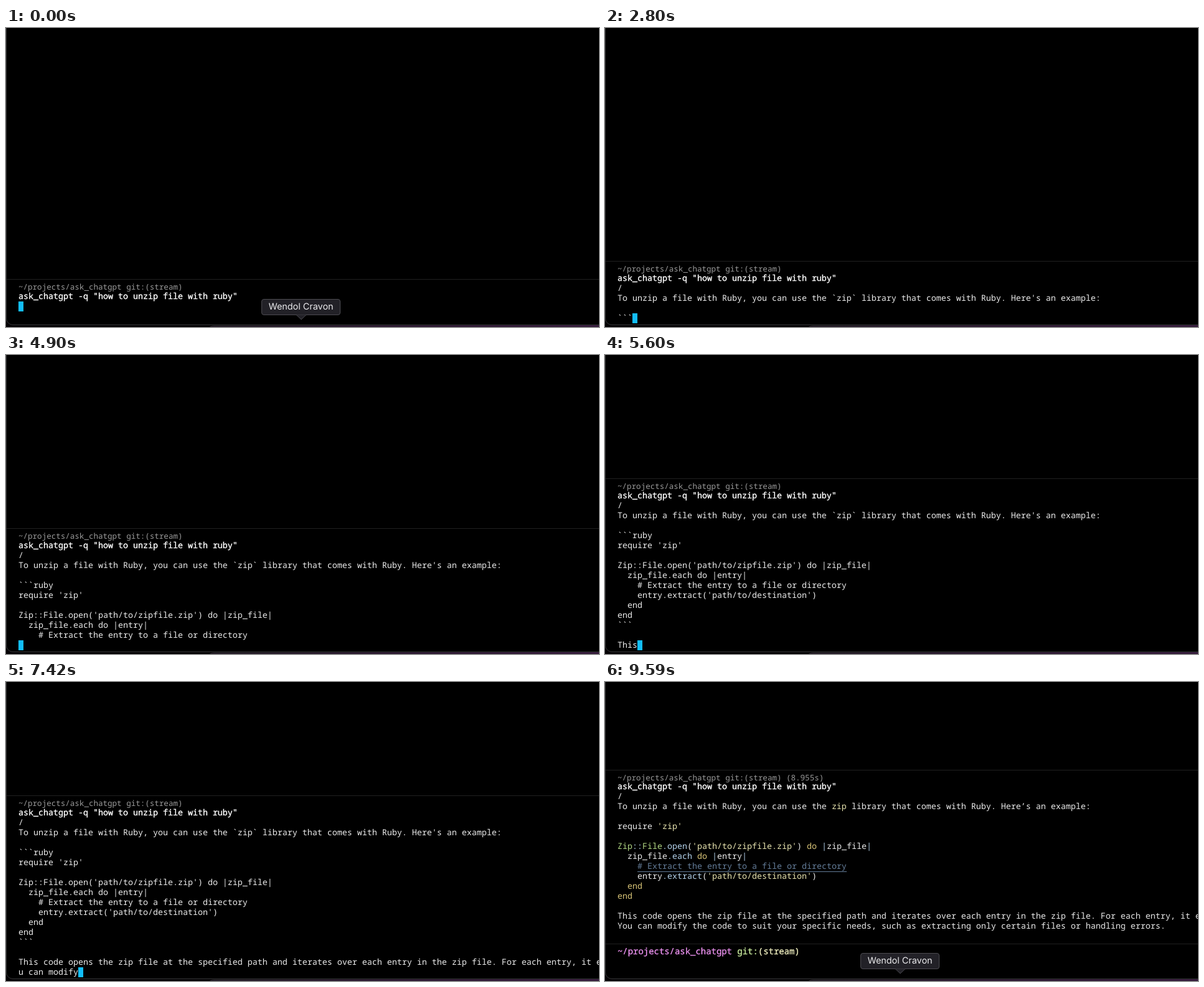
Recreate the animation shown at these times as an HTML page. Size 952x480 px, loop 9730 ms.

```html
<!DOCTYPE html>
<html lang="en">
<head>
<meta charset="utf-8">
<title>Terminal session</title>
<style>
html, body { margin: 0; width: 100%; height: 100%; overflow: hidden; background: #000; }
#stage {
  position: relative; width: 952px; height: 480px; overflow: hidden;
  background: linear-gradient(90deg, #050305 35%, #1c0a20);
  font: 13.333px/16px "Noto Sans Mono", "DejaVu Sans Mono", monospace;
  color: #ebebeb; text-rendering: geometricPrecision; font-variant-ligatures: none;
}
#stage div, pre { position: absolute; box-sizing: border-box; }
pre { margin: 0; left: 20px; font: inherit; white-space: pre; }
#window {
  left: 0; top: -20px; width: 980px; height: 497px;
  background: #000; border: 1px solid #363638; border-radius: 11px;
}
#dock {
  left: 320px; top: 478px; width: 700px; height: 30px; border-radius: 14px;
  background: linear-gradient(90deg, #39353b, #4d2c55 45%, #60306a);
}
#dock::after {
  content: ""; position: absolute; inset: 1px; border-radius: 13px; background: #170d1a;
}
#block { left: 0; top: 0; width: 952px; height: 0; }
.rule { left: 1px; width: 951px; height: 1px; background: #202020; }
#head { top: 5px; font-size: 12.55px; color: #9a9a9a; }
#cmd { top: 19px; color: #fff; -webkit-text-stroke: .35px #fff; }
#block.done #cmd { top: 18px; }
#out { top: 35px; }
#result { top: 34px; }
#cursor { width: 8px; height: 16px; background: #12bdfa; }
#next { top: 284px; font-size: 13.95px; color: #f9f8c6; -webkit-text-stroke: .3px; }
#next b { color: #f094f4; }
#next i { color: #d2f5a4; }
#result b, #result i, #result u, #result s, #result em, #next b, #next i {
  font-weight: inherit; font-style: normal; text-decoration: none;
}
#result b { color: #b2d884; }
#result i { color: #b5d3ec; }
#result s { color: #e9e5b0; }
#result em { color: #d9c578; }
#result u { color: #637c98; border-bottom: 1px solid #637c98; }
#tip {
  left: 410px; top: 435px; width: 127px; height: 26px;
  background: #222127; border: 1px solid #4b4a50; border-radius: 4px;
  color: #ececee; font: 14.4px/24px Inter, "Open Sans", sans-serif;
  text-align: center; white-space: nowrap;
}
#tip svg { position: absolute; left: 54px; top: 23px; }
</style>
</head>
<body>
<div id="stage">
  <div id="window"></div>
  <div id="dock"></div>
  <div id="block">
    <div class="rule"></div>
    <pre id="head"></pre>
    <pre id="cmd">ask_chatgpt -q "how to unzip file with ruby"</pre>
    <pre id="out"></pre>
    <div id="cursor"></div>
    <div id="done">
      <pre id="result">/
To unzip a file with Ruby, you can use the <s>zip</s> library that comes with Ruby. Here’s an example:

require <s>'zip'</s>

<b>Zip</b><i>::</i><b>File</b><i>.open</i>(<s>'path/to/zipfile.zip'</s>) <em>do</em> <i>|</i>zip_file<i>|</i>
  zip_file<i>.each</i> <em>do</em> <i>|</i>entry<i>|</i>
    <u># Extract the entry to a file or directory</u>
    entry<i>.extract</i>(<s>'path/to/destination'</s>)
  <em>end</em>
<em>end</em>

This code opens the zip file at the specified path and iterates over each entry in the zip file. For each entry, it extracts the file to the destination.
You can modify the code to suit your specific needs, such as extracting only certain files or handling errors.</pre>
      <div class="rule" style="top:279px"></div>
      <pre id="next"><b>~/projects/ask_chatgpt</b> <i>git:</i>(stream)</pre>
    </div>
  </div>
  <div id="tip">Wendol Cravon<svg width="18" height="10"><path d="M1 1.5L9 9L17 1.5" fill="#222127" stroke="#4b4a50"/><path d="M0 0H18V1H0Z" fill="#222127"/></svg></div>
</div>
<script>
const LOOP = 9730, STEP = 70, ROW = 16;
const RUN = 490, STREAM = 910, FINISH = 8330, TIP_OFF = 2100, TIP_ON = 9450;

const reply = `To unzip a file with Ruby, you can use the \`zip\` library that comes with Ruby. Here's an example:

\`\`\`ruby
require 'zip'

Zip::File.open('path/to/zipfile.zip') do |zip_file|
  zip_file.each do |entry|
    # Extract the entry to a file or directory
    entry.extract('path/to/destination')
  end
end
\`\`\`

This code opens the zip file at the specified path and iterates over each entry in the zip file. For each entry, it extracts the file to the specified destination. Yo
u can modify the code to suit your specific needs, such as extracting only certain files or handling errors.`;

// Reply is typed up to the end of each phrase at the given time.
const marks = [
  [STREAM, ''], [1400, 'use the'], [1540, '`zip`'], [1680, 'that comes'], [1890, 'that comes'],
  [2520, 'example:'], [3570, '\n\nZip'], [3850, 'do |zip'], [4620, 'a file or'],
  [4760, 'a file or'], [4830, 'directory'], [4900, 'directory\n'], [5600, '\n\nThis'],
  [5670, '\n\nThis'], [5740, 'This code'], [6020, 'This code'], [6930, 'it extracts'],
  [7350, '. Yo'], [7420, 'can modify'], [8190, 'errors.'],
].map(([t, s]) => [t, reply.indexOf(s) + s.length]);

// Ends of the tokens in which the reply arrives.
const ends = [0];
for (const m of reply.matchAll(/\n|[^\S\n]*(?:[A-Za-z]+|[^A-Za-z\s]+)/g)) {
  ends.push(m.index + m[0].length);
}

function typed(t) {
  const k = marks.findIndex(m => m[0] > t);
  if (k < 0) return reply.length;
  const [t0, n0] = marks[k - 1], [t1, n1] = marks[k];
  const n = n0 + (n1 - n0) * (t - t0) / (t1 - t0);
  return ends.findLast(e => e <= n + 1e-6);
}

function screen(t) {
  if (t < RUN) return '';
  if (t < STREAM) return '|/-\\'[Math.floor((t - RUN) / 100) % 4];
  return '/\n' + reply.slice(0, typed(t));
}

const $ = id => document.getElementById(id);
const show = (id, on) => { $(id).style.visibility = on ? 'visible' : 'hidden'; };

function draw(time) {
  const t = Math.floor((time % LOOP) / STEP) * STEP;
  const done = t >= FINISH;
  const text = screen(t), lines = text.split('\n'), rows = lines.length;
  const top = done ? 141 : rows === 1 ? 403 : 438 - ROW * rows;
  $('block').style.top = top + 'px';
  $('block').classList.toggle('done', done);
  $('head').textContent = '~/projects/ask_chatgpt git:(stream)' + (done ? ' (8.955s)' : '');
  $('out').textContent = text;
  $('cursor').style.left = 20 + 8 * lines[rows - 1].length + 'px';
  $('cursor').style.top = 20 + ROW * rows + 'px';
  show('out', !done);
  show('cursor', !done);
  show('done', done);
  show('tip', t < TIP_OFF || t >= TIP_ON);
}

const start = performance.now();
function tick() {
  draw(performance.now() - start);
  requestAnimationFrame(tick);
}
tick();
</script>
</body>
</html>
```
